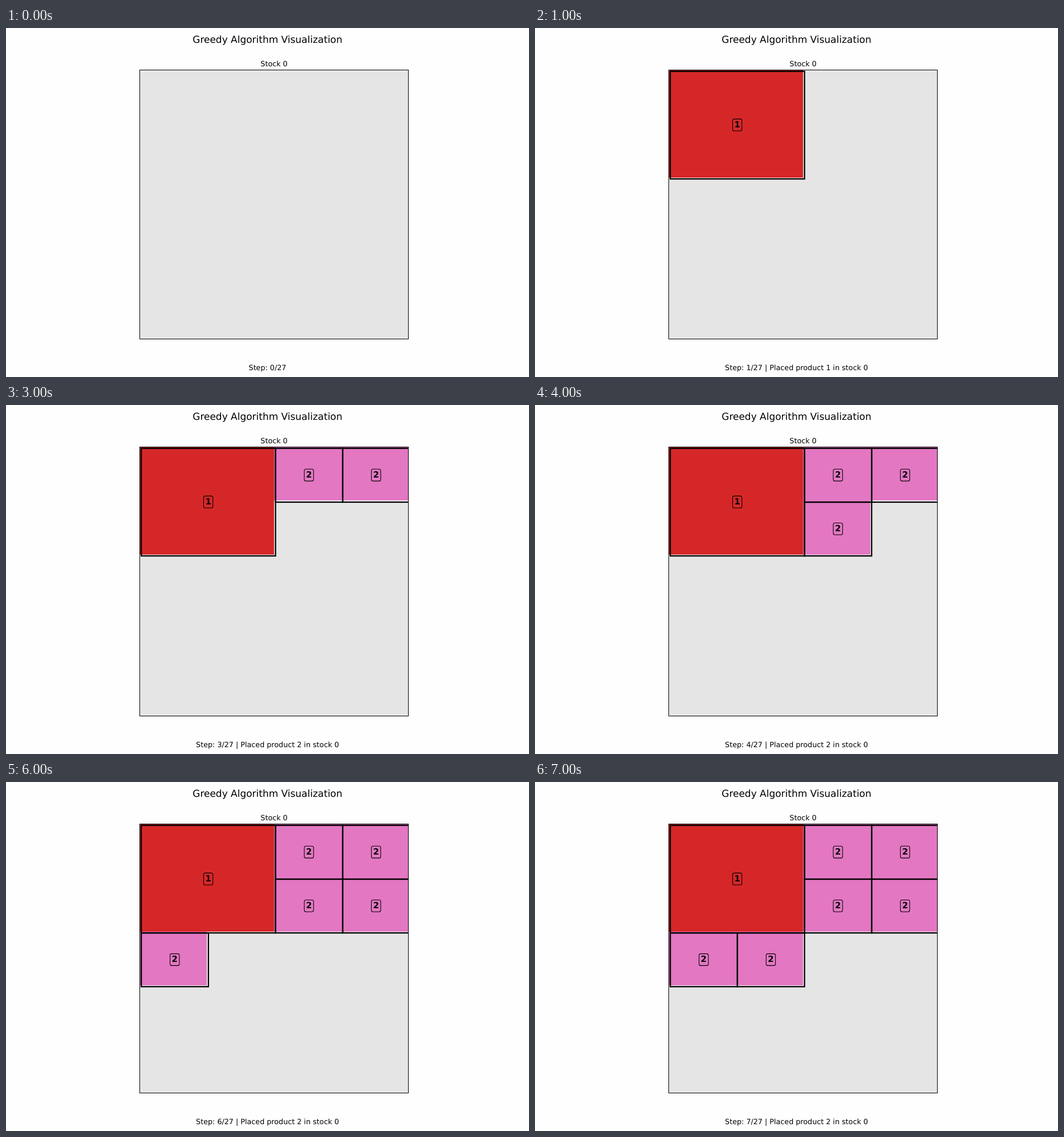
An HTML page that plays this animation: 917 px wide and 611 px high, repeating every 8 s.

```html
<!DOCTYPE html>
<html lang="en">
<head>
<meta charset="utf-8">
<title>Greedy Algorithm Visualization</title>
<style>
  html, body { margin: 0; width: 100%; height: 100%; overflow: hidden; background: #fefefe; }
  svg { display: block; width: 917px; height: 611px; }
  text { font: 12.73px "DejaVu Sans", sans-serif; text-anchor: middle; text-rendering: geometricPrecision; }
  .title { font-size: 16.98px; }
  .num { font-size: 14.85px; font-weight: bold; }
  .fill { shape-rendering: crispEdges; }
  .edge { fill: none; stroke: #000; stroke-width: 2.29; }
  .tag { stroke: #000; stroke-width: 1.06; }
</style>
</head>
<body>
<svg viewBox="0 0 917 611">
  <clipPath id="area"><rect x="234.5" y="73.5" width="471" height="471"/></clipPath>
  <text class="title" x="458.5" y="26">Greedy Algorithm Visualization</text>
  <text x="470" y="67">Stock 0</text>
  <rect class="fill" x="235" y="74" width="470" height="470" fill="#e5e5e5"/>
  <g clip-path="url(#area)">
    <g id="gaps"></g>
    <g id="fills"></g>
    <g id="edges"></g>
  </g>
  <rect x="234.5" y="73.5" width="471" height="471" fill="none" stroke="#000"/>
  <g id="tags"></g>
  <text id="status" x="458.5" y="599">Step: 0/27</text>
</svg>
<script>
  const STEP = 1000, STEPS = 8, UNIT = 4.707, LEFT = 234.6, TOP = 73.3;
  const kinds = {
    1: { w: 50, h: 40, color: '#d62728' },
    2: { w: 25, h: 20, color: '#e377c2' }
  };
  // product, column, row: in order of placement
  const placed = [[1, 0, 0], [2, 50, 0], [2, 75, 0], [2, 50, 20], [2, 75, 20], [2, 0, 40], [2, 25, 40]];

  const $ = id => document.getElementById(id);

  function add(parent, tag, attrs) {
    const el = document.createElementNS('http://www.w3.org/2000/svg', tag);
    for (const key in attrs) el.setAttribute(key, attrs[key]);
    return parent.appendChild(el);
  }

  const pieces = placed.map(([id, col, row]) => {
    const { w, h, color } = kinds[id];
    const x = LEFT + col * UNIT, y = TOP + row * UNIT;
    const width = w * UNIT, height = h * UNIT;
    // outlines sit half a cell further right and down than the fills
    const ex = x + UNIT / 2 + 0.25, ey = y + UNIT / 2 + 0.25;
    const cx = x + (width + UNIT) / 2, cy = y + (height + UNIT) / 2;

    const gap = add($('gaps'), 'rect', { class: 'fill', x, y, width: width + 2, height: height + 2, fill: '#f8f8f8' });
    const fill = add($('fills'), 'rect', { class: 'fill', x, y, width, height, fill: color });
    const edge = add($('edges'), 'rect', { class: 'edge', x: ex, y: ey, width, height });
    const tag = add($('tags'), 'g', {});
    add(tag, 'rect', { class: 'tag', x: cx - 8.15, y: cy - 10.4, width: 16.3, height: 20.8, rx: 2.97, fill: color });
    add(tag, 'text', { class: 'num', x: cx, y: cy + 4.2 }).textContent = id;
    return [gap, fill, edge, tag];
  });

  let shown = -1;

  function show(step) {
    pieces.forEach((parts, i) => {
      for (const el of parts) el.style.display = i < step ? '' : 'none';
    });
    const note = step ? ` | Placed product ${placed[step - 1][0]} in stock 0` : '';
    $('status').textContent = `Step: ${step}/27${note}`;
    shown = step;
  }

  function tick() {
    const step = Math.floor(performance.now() / STEP) % STEPS;
    if (step !== shown) show(step);
    requestAnimationFrame(tick);
  }
  tick();
</script>
</body>
</html>
```
